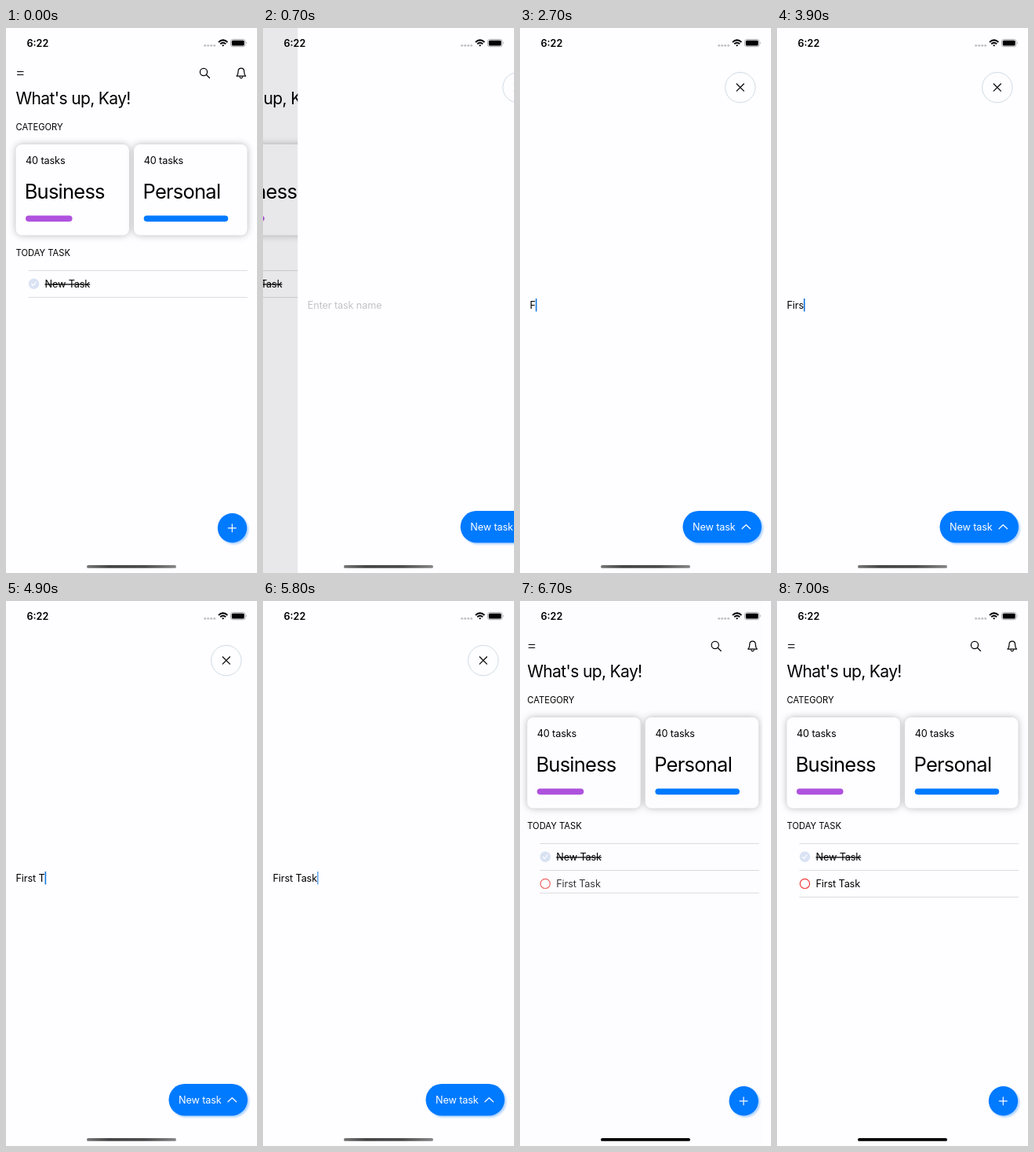
These frames come from a looping animation (320x693 px, 8000 ms). An HTML page:

```html
<!DOCTYPE html>
<html lang="en">
<head>
<meta charset="utf-8">
<title>Task list</title>
<style>
  html, body { margin: 0; width: 100%; height: 100%; overflow: hidden; background: #fefdff; }
  svg { display: block; width: 320px; height: 693px; }
  text { font: 12.7px Inter, "Liberation Sans", sans-serif; letter-spacing: -.01em; white-space: pre; }
  .title { font-size: 21px; letter-spacing: -.03em; }
  .label { font-size: 11.2px; letter-spacing: 0; }
  .big { font-size: 25.5px; letter-spacing: -.03em; }
  .clock { font-size: 12.6px; font-weight: 600; letter-spacing: 0; }
  .line { fill: none; stroke: #000; stroke-width: 1.2; stroke-linecap: round; stroke-linejoin: round; }
  .white { stroke: #fff; }
  .rule { stroke: #dcdcde; stroke-width: 1; }
  .card { fill: #fefdff; filter: drop-shadow(0 0 5px rgba(0, 0, 0, .28)); }
  .button { fill: #007aff; filter: drop-shadow(2px 2.5px 1px rgba(0, 122, 255, .32)); }
</style>
</head>
<body>
<svg viewBox="0 0 320 693">
  <defs>
    <linearGradient id="fade">
      <stop offset="0" stop-color="#777"/>
      <stop offset=".25" stop-color="#444"/>
      <stop offset=".65" stop-color="#4c4c4c"/>
      <stop offset="1" stop-color="#888"/>
    </linearGradient>
  </defs>

  <g id="home">
    <rect width="320" height="693" fill="#fefdff"/>
    <path class="line" d="M14.5 55.5h7.5M14.5 59.5h7.5"/>
    <g class="line">
      <circle cx="252" cy="56" r="4.6"/>
      <path d="M255.5 59.5l4 4"/>
      <path d="M294 61.2q2-2 2-5.700q0-4.300 3.800-4.300t3.800 4.300q0 3.700 2 5.700zM298 62.500q1.800 2.600 3.600 0"/>
    </g>
    <text class="title" x="12.500" y="97">What's up, Kay!</text>
    <text class="label" x="12.500" y="130">CATEGORY</text>

    <rect class="card" x="12.500" y="148" width="144.500" height="115.500" rx="8"/>
    <rect class="card" x="163" y="148" width="144.500" height="115.500" rx="8"/>
    <text x="25" y="172.500">40 tasks</text>
    <text x="175.700" y="172.500">40 tasks</text>
    <text class="big" x="23.700" y="217">Business</text>
    <text class="big" x="174.500" y="217">Personal</text>
    <rect x="25" y="238.500" width="59.500" height="7.700" rx="3.850" fill="#af52de"/>
    <rect x="175.700" y="238.500" width="107.500" height="7.700" rx="3.850" fill="#007aff"/>

    <text class="label" x="12.500" y="290">TODAY TASK</text>
    <path class="rule" d="M28.500 308.500H308M28.500 342.500H308"/>
    <circle cx="35.500" cy="325.200" r="6.700" fill="#d9e3f4"/>
    <path class="line white" d="M32.800 325.500l1.900 2 3.500-4.600"/>
    <text x="49.500" y="330" text-decoration="line-through">New Task</text>
    <g id="row">
      <g id="rowBody">
        <circle cx="35.500" cy="359.400" r="6.100" fill="none" stroke="#f03b3b" stroke-width="1.200"/>
        <text x="49.500" y="364">First Task</text>
      </g>
      <path id="rowRule" class="rule" d="M28.500 342.500H308"/>
    </g>

    <g id="add">
      <circle class="button" cx="288.500" cy="635.800" r="18.700"/>
      <path class="line white" d="M283.300 635.800h10M288.300 630.800v10"/>
    </g>
    <rect id="dim" width="320" height="693"/>
  </g>

  <g id="form">
    <rect width="320" height="693" fill="#fefdff"/>
    <circle cx="280.800" cy="75.600" r="19.200" fill="none" stroke="#cfdce7"/>
    <path class="line" d="M276.200 71l9.200 9.200M285.400 71l-9.200 9.200"/>
    <text id="hint" x="12.500" y="356.500" fill="#c3c3c6">Enter task name</text>
    <text id="entry" x="12.500" y="356.500"></text>
    <rect id="caret" y="344" width="1.600" height="16.500" fill="#1479e0"/>
    <g id="submit">
      <rect class="button" x="207.500" y="614" width="100.500" height="40.500" rx="20.250"/>
      <text x="220" y="638.500" fill="#fff">New task</text>
      <path class="line white" d="M283 636.800l5.300-5 5.300 5"/>
    </g>
  </g>

  <text class="clock" x="26.500" y="23.500">6:22</text>
  <g fill="#c4c4c6">
    <circle cx="253.700" cy="22.300" r="1.500"/><circle cx="257.700" cy="22.300" r="1.500"/>
    <circle cx="261.700" cy="22.300" r="1.500"/><circle cx="265.700" cy="22.300" r="1.500"/>
  </g>
  <g fill="none" stroke="#000" stroke-width="2">
    <path d="M271 18q5.700-5.200 11.400 0M273.200 20.300q3.500-3 7 0"/>
    <path d="M275 21.800q1.700-1.300 3.400 0l-1.700 1.800z" fill="#000" stroke="none"/>
  </g>
  <rect x="286.500" y="14.500" width="18.500" height="9.200" rx="2.700" fill="none" stroke="#9b9b9d" stroke-width=".8"/>
  <rect x="287.800" y="15.800" width="15.900" height="6.600" rx="1.500"/>
  <path d="M306 17.600q1.600 1.500 0 3z" fill="#9b9b9d"/>
  <rect id="bar" x="103" y="683" width="114" height="3.800" rx="1.900"/>
</svg>
<script>
  const LOOP = 8000, PUSH = 500, POP = 6400;
  const NAME = 'First Task';
  const KEYS = [2700, 3100, 3400, 3900, 4100, 4400, 4700, 5000, 5200, 5300];
  const el = id => document.getElementById(id);
  const set = (id, attrs) => {
    for (const key in attrs) el(id).setAttribute(key, attrs[key]);
  };
  const clamp = v => Math.min(1, Math.max(0, v));

  // Critically damped spring from 0 to 1, settled after 600 ms
  function spring(ms) {
    if (ms <= 0) return 0;
    if (ms >= 600) return 1;
    const x = ms * 0.0173;
    return 1 - (1 + x) * Math.exp(-x);
  }

  function drawPages(t) {
    const open = spring(t - PUSH) - spring(t - POP);
    set('home', { transform: `translate(${-96 * open})` });
    set('form', {
      transform: `translate(${320 * (1 - open)})`,
      visibility: open > 0 ? 'visible' : 'hidden'
    });
    set('dim', { opacity: 0.1 * open });
    set('add', { opacity: t >= PUSH && t < PUSH + 100 ? 0.75 : 1 });
    set('submit', { opacity: t >= POP - 100 && t < POP ? 0.75 : 1 });
    set('bar', { fill: t < POP ? 'url(#fade)' : '#000' });
  }

  function drawEntry(t) {
    const count = KEYS.filter(k => k <= t).length;
    el('entry').textContent = NAME.slice(0, count);
    set('hint', { opacity: count ? 0 : 1 });

    const age = Math.max(0, t - (count ? KEYS[count - 1] : 1900)) % 1000;
    const blink = clamp((Math.abs(age - 725) - 100) / 200);
    const shown = t < POP ? clamp((t - 1550) / 200) : 0;
    const width = count ? el('entry').getComputedTextLength() : 0;
    set('caret', { x: 12.5 + width, opacity: blink * shown });
  }

  function drawRow(t) {
    const u = clamp((t - POP) / 400);
    const grow = u * u * (3 - 2 * u);
    set('row', { visibility: grow ? 'visible' : 'hidden' });
    set('rowBody', { opacity: clamp(grow * 1.4 - 0.4) });
    set('rowRule', { transform: `translate(0 ${34 * grow})` });
  }

  function frame() {
    const t = performance.now() % LOOP;
    drawPages(t);
    drawEntry(t);
    drawRow(t);
    requestAnimationFrame(frame);
  }
  frame();
</script>
</body>
</html>
```
